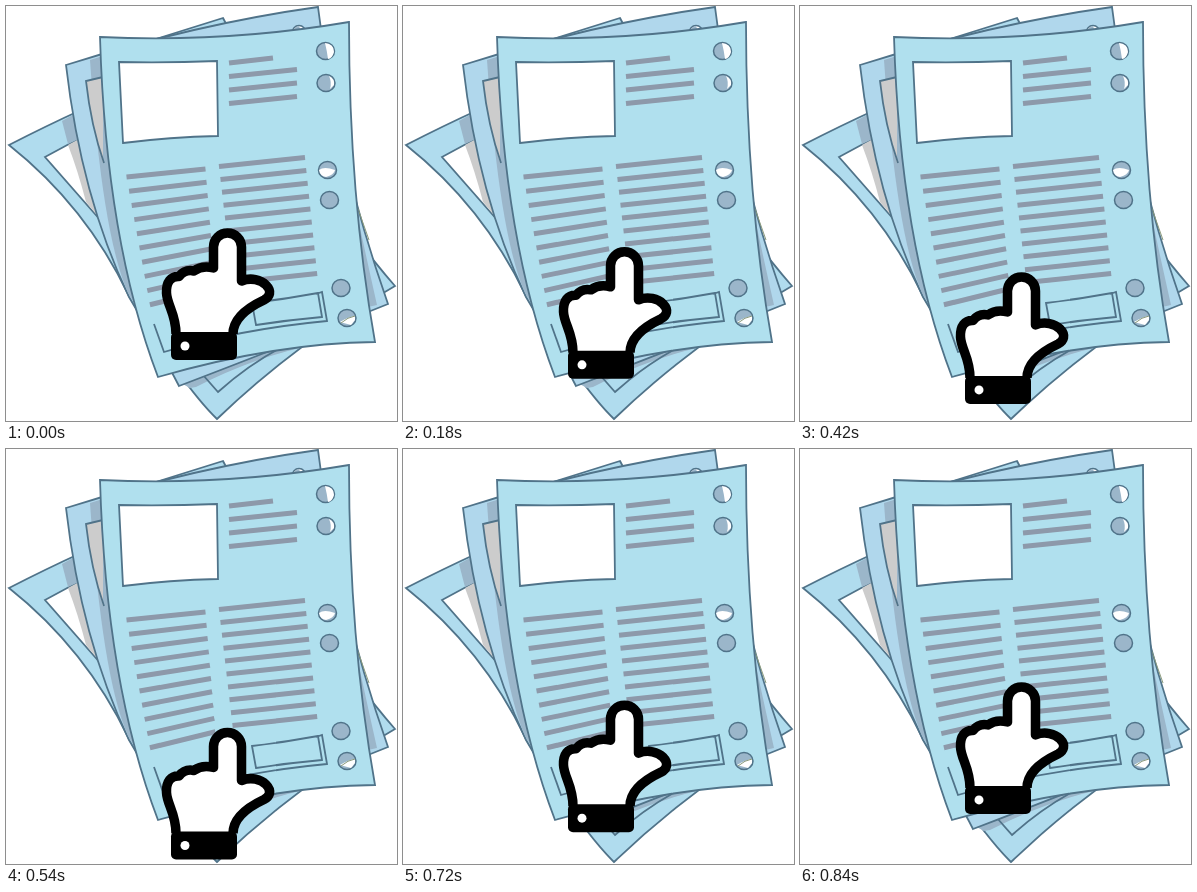
These frames come from a looping animation (391 by 415 pixels, 900 ms). An HTML page:

```html
<!DOCTYPE html>
<html>
<head>
<meta charset="utf-8">
<style>
html, body { margin: 0; width: 100%; height: 100%; overflow: hidden; background: #fff; }
svg { display: block; }
.sheet, .line, .photo, .hole { stroke: #507389; stroke-width: 1.8; }
.line { fill: none; }
.photo { fill: #fff; }
.shade { fill: #9bb6ca; }
.gray { fill: #ccc; }
.white { fill: #fff; }
.hole { fill: #9bb6ca; stroke-width: 1.5; }
.edge { fill: none; stroke: #8a9a7c; }
#text { stroke: #8d99aa; stroke-width: 5; }
</style>
</head>
<body>
<svg width="391" height="415" viewBox="0 0 391 415">
  <!-- back sheet -->
  <path class="sheet" fill="#b0dcee" d="M3 139Q40 120 75 104L150 33L217 12Q310 190 389 280Q290 337 211 413Q177 380 123 290Q80 200 3 139Z"/>
  <path class="photo" d="M39 151L76 131L96 216Z"/>
  <path class="gray" d="M62 139L75 132L95 214L80 196Q72 165 62 139Z"/>
  <path class="shade" d="M56 115L72 106L77 131L62 138Z"/>
  <path class="shade" d="M173 376Q240 345 292 338H312Q250 350 190 381L184 382Z"/>
  <path class="line" d="M197 369L212 386Q242 359 276 341"/>

  <!-- middle sheet -->
  <path class="sheet" fill="#b0d7ec" d="M60 59Q190 18 312 1Q330 150 382 298Q270 343 173 380Q155 345 123 291Q75 190 60 59Z"/>
  <path class="shade" d="M84 54L100 49L130 300L122 287Q96 228 84 54Z"/>
  <path class="shade" d="M345 180Q360 250 371 299L362 301Z"/>
  <path class="gray" d="M80 75L97 71V157Q86 120 80 75Z"/>
  <path class="line" d="M97 71L80 75Q85 120 98 157"/>
  <path class="edge" d="M350 197L363 234"/>
  <ellipse class="hole" style="fill:#fff" cx="293" cy="27" rx="7" ry="7.5"/>
  <path class="shade" d="M287 27Q288 21 293 20Q295 24 294 30H287Z"/>

  <!-- front sheet -->
  <path class="sheet" fill="#b0e0ee" d="M94 31Q220 37 343 16Q343 190 369 336Q270 337 152 371Q100 235 94 31Z"/>
  <path class="photo" d="M113 56Q162 57 211 55L212 130Q164 131 117 137Z"/>
  <g id="text"></g>
  <path class="line" d="M246 297Q280 293 312 287L316 311Q282 314 250 319ZM310 288L316 286L321 315Q235 323 158 346L148 318"/>

  <g id="holes"></g>
  <path class="white" d="M319 37Q328 38 328 46Q326 53 322 53Q321 45 319 37Z"/>
  <path class="white" d="M323 70Q329 73 328 79L324 83Q326 76 323 70Z"/>
  <path class="white" d="M313 164Q318 160 329 164Q328 169 320 171Q314 170 313 164Z"/>
  <path class="white" d="M334 316Q342 311 349 310L349 314L345 319Z"/>
  <path class="edge" d="M335 317Q342 311 349 310"/>

  <g id="hand">
    <path fill="#fff" stroke="#000" stroke-width="9.5" stroke-linejoin="round" d="M170 328C170 308 161 299 160.5 287C160 276 165 270 173 270.5Q179 263 188 265Q196 259 207.5 262V241a14 14 0 0 1 28 0V275C245 271 255 274 260 279C266 285 264 291 258 294C241 302 227 313 227 328"/>
    <rect x="165" y="326" width="66" height="28" rx="5"/>
    <circle class="white" cx="179" cy="340" r="4.5"/>
  </g>
</svg>
<script>
const byId = id => document.getElementById(id);

const bar = (x1, y1, x2, y2) => `<path d="M${x1} ${y1}L${x2} ${y2}"/>`;
let bars = bar(223, 57, 267, 52);
for (let i = 0; i < 3; i++) bars += bar(223, 70.5 + 13.5 * i, 291, 63.5 + 13.5 * i);
for (let i = 0; i < 10; i++) {
  bars += bar(120.5 + 2.6 * i, 171 + 14.2 * i, 199.5 + 1.1 * i, 163 + 13.3 * i);
  bars += bar(213 + 1.5 * i, 160.5 + 12.9 * i, 299 + 1.35 * i, 151.5 + 12.9 * i);
}
byId('text').innerHTML = bars;

const holes = [[319.5, 45], [320, 77], [321.5, 164], [323.5, 194], [335, 282], [341, 312]];
byId('holes').innerHTML = holes.map(([x, y]) =>
  `<ellipse class="hole" cx="${x}" cy="${y}" rx="9" ry="8.5"/>`).join('');

// The hand sinks slowly, then rises faster.
const STEP = 60, COUNT = 15, DOWN = 9, UP = 6.2, DROP = 56.5;
function draw() {
  const step = Math.floor(performance.now() / STEP) % COUNT;
  const depth = step <= DOWN ? step / DOWN : 1 - (step - DOWN) / UP;
  byId('hand').setAttribute('transform', `translate(0 ${(DROP * depth).toFixed(2)})`);
  requestAnimationFrame(draw);
}
draw();
</script>
</body>
</html>
```
